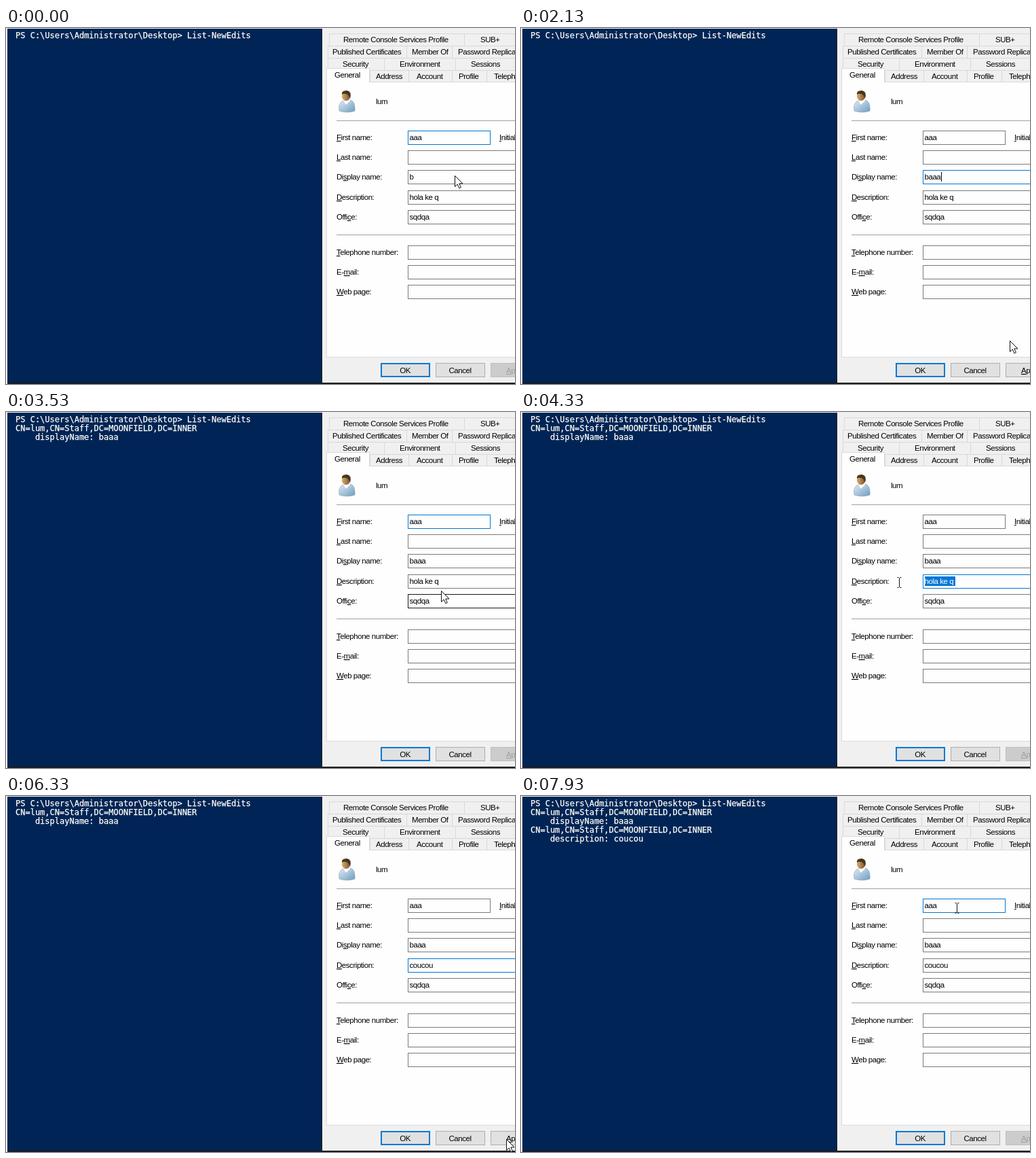
Recreate the animation shown at these times as an HTML page. Size 750 px wide and 524 px high, loop 8 s.

```html
<!DOCTYPE html>
<html lang="en">
<head>
<meta charset="utf-8">
<title>Directory change watcher</title>
<style>
  html, body { margin: 0; width: 100%; height: 100%; overflow: hidden; background: #f0f0f0; }
  svg { display: block; width: 750px; height: 524px; }
  text { white-space: pre; }
  .ui { font: 11.5px "Liberation Sans", Arial, sans-serif; letter-spacing: -.45px; fill: #000; }
  .term { font: 12px "DejaVu Sans Mono", monospace; fill: #fffff4; stroke: #fffff4; stroke-width: .25; }
  .key { text-decoration: underline; }
  .tab { fill: #f0f0f0; stroke: #d9d9d9; }
  .page { fill: #fefefe; }
  .box { fill: #fefefe; stroke: #7a7a7a; }
  .box.hover { stroke: #171717; }
  .box.focus { stroke: #0078d7; }
  .btn { fill: #e1e1e1; stroke: #adadad; }
  .btn.off { fill: #cccccc; stroke: #bfbfbf; }
  .btn.hot { fill: #e5f1fb; stroke: #0078d7; }
  .rule { stroke: #a0a0a0; }
</style>
</head>
<body>
<svg id="stage" viewBox="0 0 750 524">
  <defs>
    <clipPath id="pick"><rect id="pickArea" y="242" height="14"/></clipPath>
    <linearGradient id="shirt" x2="1" y2="1">
      <stop offset="0" stop-color="#e2edf4"/><stop offset="1" stop-color="#6d9cc0"/>
    </linearGradient>
    <linearGradient id="skin" x2="1">
      <stop offset="0" stop-color="#dcae74"/><stop offset="1" stop-color="#7c5128"/>
    </linearGradient>
  </defs>
  <rect width="750" height="524" fill="#f0f0f0"/>
  <rect x="2" y="1" width="464" height="521" fill="#012456"/>
  <path d="M465.5 1V522" stroke="#1c1c1c"/>
  <rect x="2" y="522" width="748" height="2" fill="#1c1c1c"/>
  <g id="log"></g>
  <g id="tabs"></g>
  <rect class="page" x="472.5" y="79.5" width="290" height="405" stroke="#d9d9d9"/>
  <path class="page" d="M472.5 80.5V59.5H535.5V80.5" stroke="#d9d9d9"/>
  <rect class="page" x="473" y="78" width="62" height="4"/>
  <g id="person">
    <path d="M491 122Q489 110 497 107L508 106Q515 109 514 122Q503 126 491 122Z" fill="url(#shirt)" stroke="#7f9ab0" stroke-width=".6"/>
    <path d="M497 107L501 113L508 106Z" fill="#fefefe"/>
    <ellipse cx="501" cy="100" rx="6.2" ry="7.2" fill="url(#skin)"/>
    <path d="M495 98Q494 92 502 92Q510 93 507 104Q505 98 501 97Q497 96 495 98Z" fill="#4a3519"/>
  </g>
  <path class="rule" d="M487 136.5H750M487 304.5H750"/>
  <g id="form"></g>
  <rect id="pickFill" y="242" height="14" fill="#0078d7"/>
  <text id="pickText" class="ui" x="594.5" y="253" style="fill:#fff" clip-path="url(#pick)">hola ke q</text>
  <rect id="caret" width="1" height="14" fill="#000"/>
  <g id="buttons"></g>
  <path id="arrow" d="M.5 .5V16.5L4.2 13L6.8 18.8L9.3 17.7L6.8 12H12Z" fill="#fefefe" stroke="#111"/>
  <path id="beam" d="M-2.5 -7.5H-.5M1.5 -7.5H3.5M.5 -7V7M-2.5 7.5H-.5M1.5 7.5H3.5" fill="none" stroke="#111"/>
</svg>
<script>
const LOOP = 8000;
const $ = id => document.getElementById(id);

function add(parent, tag, attrs) {
  const el = document.createElementNS("http://www.w3.org/2000/svg", tag);
  for (const k in attrs) el.setAttribute(k, attrs[k]);
  return $(parent).appendChild(el);
}

// An underscore marks the underlined access key.
function label(parent, x, y, str, attrs = {}) {
  const el = add(parent, "text", { class: "ui", x, y, ...attrs });
  el.innerHTML = str.replace(/_(.)/, '<tspan class="key">$1</tspan>');
  return el;
}

const box = (parent, cls, x, y, width, height) =>
  add(parent, "rect", { class: cls, x: x + .5, y: y + .5, width: width - 1, height: height - 1 });

// Tabs: left edge, text left, caption
const rows = [
  [8, [[476, 497, "Remote Console Services Profile"], [675, 699, "SUB+"]]],
  [26, [[474, 481, "Published Certificates"], [590, 598, "Member Of"], [657, 666, "Password Replication"]]],
  [44, [[474, 496, "Security"], [557, 580, "Environment"], [662, 685, "Sessions"]]],
  [62, [[473, 484, "General"], [536, 545, "Address"], [593, 605, "Account"], [657, 667, "Profile"], [708, 719, "Telephones"]]]
];
for (const [y, tabs] of rows) {
  tabs.forEach(([x], i) => box("tabs", "tab", x, y, (tabs[i + 1] ? tabs[i + 1][0] : 770) - x + 1, 19));
}
for (const [y, tabs] of rows) {
  for (const [, x, str] of tabs) {
    const front = str === "General";
    label(front ? "form" : "tabs", x, front ? 73 : y + 13, str);
  }
}

label("form", 545, 112, "lum");
label("form", 727, 165, "_Initials:");

const fields = {};
for (const [name, y, str, value] of [
  ["first", 151, "_First name:", "aaa"],
  ["last", 180, "_Last name:", ""],
  ["display", 209, "Di_splay name:", "b"],
  ["desc", 239, "_Description:", "hola ke q"],
  ["office", 268, "Offi_ce:", "sqdqa"],
  ["phone", 320, "_Telephone number:", ""],
  ["mail", 349, "E-_mail:", ""],
  ["web", 378, "_Web page:", ""]
]) {
  label("form", 487, y + 14, str);
  fields[name] = {
    y,
    rect: box("form", "box", 592, y, name === "first" ? 122 : 180, 21),
    text: label("form", 594.5, y + 14, value)
  };
}

box("buttons", "btn", 552, 493, 73, 21);
add("buttons", "rect", { x: 553, y: 494, width: 71, height: 19, fill: "none", stroke: "#0078d7", "stroke-width": 2 });
label("buttons", 588, 508, "OK", { "text-anchor": "middle" });
box("buttons", "btn", 633, 493, 73, 21);
label("buttons", 669, 508, "Cancel", { "text-anchor": "middle" });
const apply = box("buttons", "btn", 714, 493, 73, 21);
const applyText = label("buttons", 737, 508, "_Apply");

// Console lines: time shown, indent, text
const entry = "CN=lum,CN=Staff,DC=MOONFIELD,DC=INNER";
const lines = [
  [0, 0, "PS C:\\Users\\Administrator\\Desktop> List-NewEdits"],
  [3000, 0, entry],
  [3000, 4, "displayName: baaa"],
  [7400, 0, entry],
  [7400, 4, "description: coucou"]
].map(([at, indent, str], i) => {
  const el = add("log", "text", { class: "term", x: 14 + indent * 7.22, y: 15 + i * 13 });
  el.textContent = str;
  return [at, el];
});

// Pointer path: time, x, y
const path = [
  [0, 661, 217], [300, 655, 220], [1700, 655, 220], [2130, 720, 460], [2330, 737, 505],
  [3100, 737, 505], [3530, 641, 263], [3730, 641, 251], [4230, 557, 251], [5000, 557, 251],
  [5400, 730, 500], [5800, 737, 505], [7200, 737, 505], [7400, 730, 480], [7800, 642, 165], [8000, 642, 165]
];
const displayKeys = [1200, 1500, 1700];
const descKeys = [4700, 4800, 5000, 5100, 5200, 5300];
const focuses = [[0, "first"], [300, "display"], [2500, "first"], [3730, "desc"], [6900, "first"]];

const within = (t, ...spans) => spans.some(([a, b]) => t >= a && t < b);
const show = (el, on) => el.setAttribute("visibility", on ? "visible" : "hidden");
const typed = (keys, t) => keys.filter(k => k <= t).length;

function pointer(t) {
  const i = path.findIndex(p => p[0] > t);
  const [t0, x0, y0] = path[i - 1], [t1, x1, y1] = path[i];
  const u = (t - t0) / (t1 - t0);
  return [Math.round(x0 + (x1 - x0) * u), Math.round(y0 + (y1 - y0) * u)];
}

function render(t) {
  const [x, y] = pointer(t);
  const isBeam = within(t, [130, 1800], [3600, 5100], [7730, 8000]);
  for (const id of ["arrow", "beam"]) {
    $(id).setAttribute("transform", `translate(${x} ${y})`);
    show($(id), (id === "beam") === isBeam);
  }

  for (const [at, el] of lines) show(el, t >= at);

  const [since, focus] = focuses.filter(f => f[0] <= t).pop();
  const hover = within(t, [130, 300]) ? "display" : within(t, [3500, 3600]) ? "office"
    : within(t, [3600, 3730]) ? "desc" : "";
  for (const name in fields) {
    fields[name].rect.setAttribute("class", "box" + (name === focus ? " focus" : name === hover ? " hover" : ""));
  }

  fields.display.text.textContent = "b" + "aaa".slice(0, typed(displayKeys, t));
  const n = typed(descKeys, t);
  fields.desc.text.textContent = n ? "coucou".slice(0, n) : "hola ke q";

  // Selection follows the drag leftwards.
  const picking = focus === "desc" && !n;
  const left = Math.min(640, Math.max(595, x));
  for (const id of ["pickArea", "pickFill"]) {
    $(id).setAttribute("x", left);
    $(id).setAttribute("width", 640 - left);
  }
  show($("pickFill"), picking);
  show($("pickText"), picking);

  // The caret restarts its blink on focus and on every key.
  const last = Math.max(since, ...[...displayKeys, ...descKeys].filter(k => k <= t));
  const el = fields[focus].text;
  const end = focus === "first" ? 595 : 595 + Math.round(el.getComputedTextLength());
  $("caret").setAttribute("x", end);
  $("caret").setAttribute("y", fields[focus].y + 3);
  show($("caret"), t >= 300 && !picking && (t - last) % 1060 < 530);

  const enabled = within(t, [1200, 2500], [4700, 6900]);
  const hot = within(t, [2330, 2500], [6400, 6900]);
  apply.setAttribute("class", "btn" + (hot ? " hot" : enabled ? "" : " off"));
  applyText.style.fill = enabled ? "#000" : "#a0a0a0";
}

// The picture advances ten times a second, alternating 130 and 70 ms holds.
function hold(t) {
  const base = Math.floor(t / 200) * 200;
  return t - base < 130 ? base : base + 130;
}

const start = performance.now();
let shown = -1;
function tick() {
  const t = hold((performance.now() - start) % LOOP);
  if (t !== shown) render(shown = t);
  requestAnimationFrame(tick);
}
tick();
</script>
</body>
</html>
```
